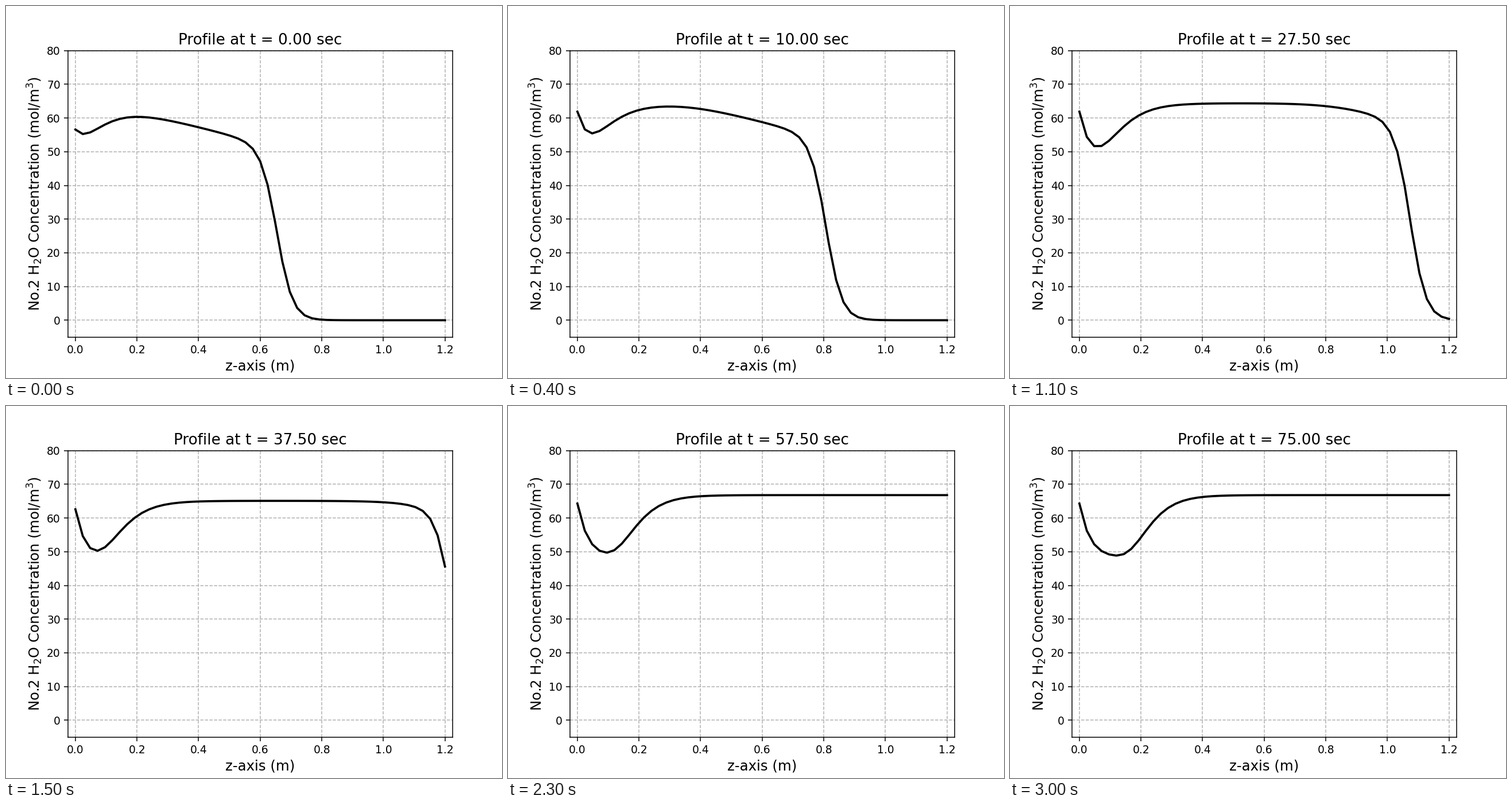
Write a matplotlib script that moves like this. It is 864 px wide and 648 px high and loops after 3100 ms.

```python
import numpy as np
import matplotlib.pyplot as plt
from matplotlib.animation import FuncAnimation

FRAMES = 31
STEP_MS = 100
DT = 2.5          # simulated seconds per frame
DZ = 0.024        # grid spacing in metres
NODES = np.arange(51)


def gompertz(x):
    return np.exp(-np.exp(-x))


def logistic(x):
    return 1 / (1 + np.exp(-x))


def softplus(x, width):
    return width * np.log1p(np.exp(x / width))


def concentration(i):
    """Concentration at every node, from waves that travel along z."""
    # Inlet and floor levels: a quick start, then a slow rise.
    inlet = np.interp(i, [0, 1, 11.7, 23], [56.6, 61.9, 61.9, 64.3])
    floor = np.interp(i, [11.7, 23], [45.8, 48.2])

    # Slow wave: climbs from the dip to the plateau.
    wave = 1.2 + 0.28 * i - 0.0011 * i ** 2
    rise = 18.6 * gompertz((0.36 + 0.0025 * i) * (NODES - wave))

    # Shoulder: the plateau slopes down ahead of a moving knee.
    knee = 4.3 + 2.75 * i
    body = floor + rise - 0.57 * softplus(NODES - knee, 3)

    # The inlet value fades into the bed, halving at each node.
    body += (inlet - body[0]) * 0.5 ** NODES

    # Fast wave: the steep front.
    front = 27.3 + 1.6 * i - 0.001 * i ** 2
    return body * logistic(0.94 * (front - NODES))


fig, ax = plt.subplots(figsize=(6.4, 4.8), dpi=135)
fig.subplots_adjust(left=0.125, right=0.9, bottom=0.11, top=0.88)
ax.set_xlim(-DZ, 1.2 + DZ)
ax.set_ylim(-5, 80)
ax.grid(linestyle="--")
ax.set_xlabel("z-axis (m)", fontsize=13, labelpad=3.3)
ax.set_ylabel("No.2 H$_2$O Concentration (mol/m$^3$)", fontsize=13, labelpad=2.5)
title = ax.set_title("", fontsize=14)
curve, = ax.plot([], [], color="black", linewidth=2)


def update(i):
    curve.set_data(NODES * DZ, concentration(i))
    title.set_text(f"Profile at t = {i * DT:.2f} sec")
    return curve, title


anim = FuncAnimation(fig, update, frames=FRAMES, interval=STEP_MS, repeat=True)
plt.show()
```
